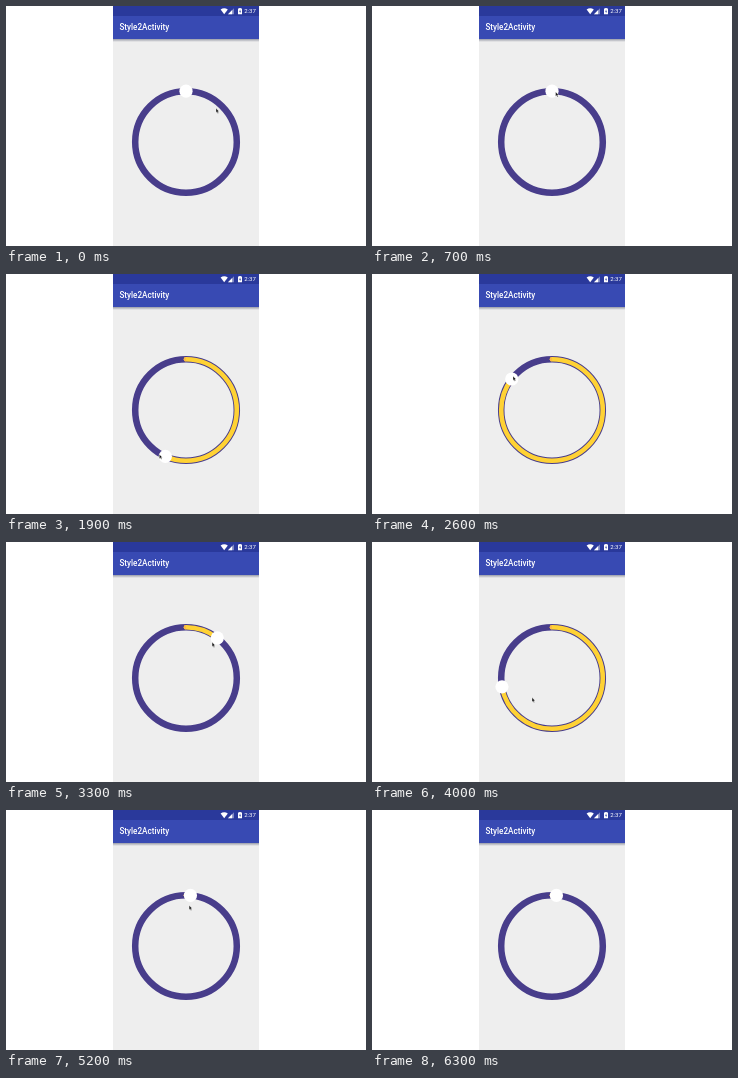
An HTML page for the animation above (6400 ms loop, 360x240 px).

```html
<!DOCTYPE html>
<html lang="en">
<head>
<meta charset="utf-8">
<title>Circular seek bar</title>
<style>
  html, body { margin: 0; width: 100%; height: 100%; overflow: hidden; background: #fff; }
  svg { display: block; width: 360px; height: 240px; }
  text { font-family: Roboto, sans-serif; fill: #fff; }
</style>
</head>
<body>
<svg viewBox="0 0 360 240">
  <defs>
    <linearGradient id="shade" x2="0" y2="1">
      <stop offset="0" stop-color="#999ca8"/>
      <stop offset="1" stop-color="#eee"/>
    </linearGradient>
  </defs>

  <rect x="107" width="146" height="240" fill="#eee"/>
  <rect x="107" y="33" width="146" height="3" fill="url(#shade)"/>
  <rect x="107" y="10" width="146" height="23" fill="#384ab3"/>
  <rect x="107" width="146" height="10" fill="#2a399b"/>

  <g fill="#fff">
    <path d="M214.6 3.6Q218.2 1 221.8 3.6L218.2 8.2Z"/>
    <path d="M228 2.2V8.2H222Z" opacity=".4"/>
    <path d="M226.2 4V8.2H222Z"/>
    <path d="M233.2 1.9H234.8V2.6H236V8.2H232V2.6H233.2Z"/>
    <path d="M234.3 3.6L233.1 5.7H233.9V7.3L235 5.2H234.3Z" fill="#2a399b"/>
  </g>
  <text x="238.2" y="7.4" font-size="6.1">2:37</text>
  <text x="113.4" y="24.4" font-size="8.15" font-weight="500">Style2Activity</text>

  <g fill="none">
    <circle cx="180" cy="136" r="50.8" stroke="#483d8b" stroke-width="6.5"/>
    <path id="arc" d="M180 85.2a50.8 50.8 0 0 1 0 101.6a50.8 50.8 0 0 1 0-101.6"
      pathLength="360" stroke="#ffd234" stroke-width="4.6" stroke-linecap="round"/>
  </g>
  <path d="M180 82.9a2.3 2.3 0 0 0 0 4.6Z" fill="#fbb847"/>
  <circle id="knob" r="6.6" fill="#fff"/>
  <path id="cursor" d="M0 0V4.4L1 3.5L1.8 5.1L2.6 4.7L1.8 3.2H3.1Z"
    fill="#111" stroke="#fff" stroke-width=".35"/>
</svg>
<script>
const LOOP = 6400, STEP = 100, CX = 180, CY = 136, R = 50.8;
const CURSOR_OFF = 5700;

// [ms, degrees clockwise from the top]
const knobKeys = [
  [0, 0], [800, 0], [1200, 63.5], [1900, 204], [2900, 352],
  [3300, 38 + 360], [3450, 38 + 360], [4000, 260], [5200, 5], [LOOP, 5]
];
// [ms, degrees, distance from the centre]
const cursorKeys = [
  [0, 43, 45], [600, 4, 50], [800, 6, 49], [1200, 71.5, 44], [1900, 210, 52],
  [2900, 354, 50], [3300, 397.5, 44], [3450, 394, 43], [4000, 223.5, 28],
  [5200, 5.5, 40], [LOOP, 5.5, 40]
];

const [arc, knob, cursor] = ['arc', 'knob', 'cursor'].map(id => document.getElementById(id));

function sample(keys, t) {
  const i = keys.findIndex(k => k[0] > t);
  const a = keys[i - 1], b = keys[i];
  const p = (t - a[0]) / (b[0] - a[0]);
  return a.slice(1).map((v, j) => v + (b[j + 1] - v) * p);
}

function polar(deg, r) {
  const a = deg * Math.PI / 180;
  return [CX + r * Math.sin(a), CY - r * Math.cos(a)];
}

function place(el, [x, y]) {
  el.setAttribute('transform', `translate(${x.toFixed(2)} ${y.toFixed(2)})`);
}

function draw(t) {
  const angle = sample(knobKeys, t)[0] % 360;
  arc.setAttribute('stroke-dasharray', `${angle} 400`);
  place(knob, polar(angle, R));

  const [x, y] = polar(...sample(cursorKeys, t));
  place(cursor, [x - 0.7, y - 0.8]);
  cursor.style.display = t < CURSOR_OFF ? '' : 'none';
}

const start = performance.now();
function tick() {
  const t = (performance.now() - start) % LOOP;
  draw(Math.floor(t / STEP) * STEP);
  requestAnimationFrame(tick);
}
tick();
</script>
</body>
</html>
```
